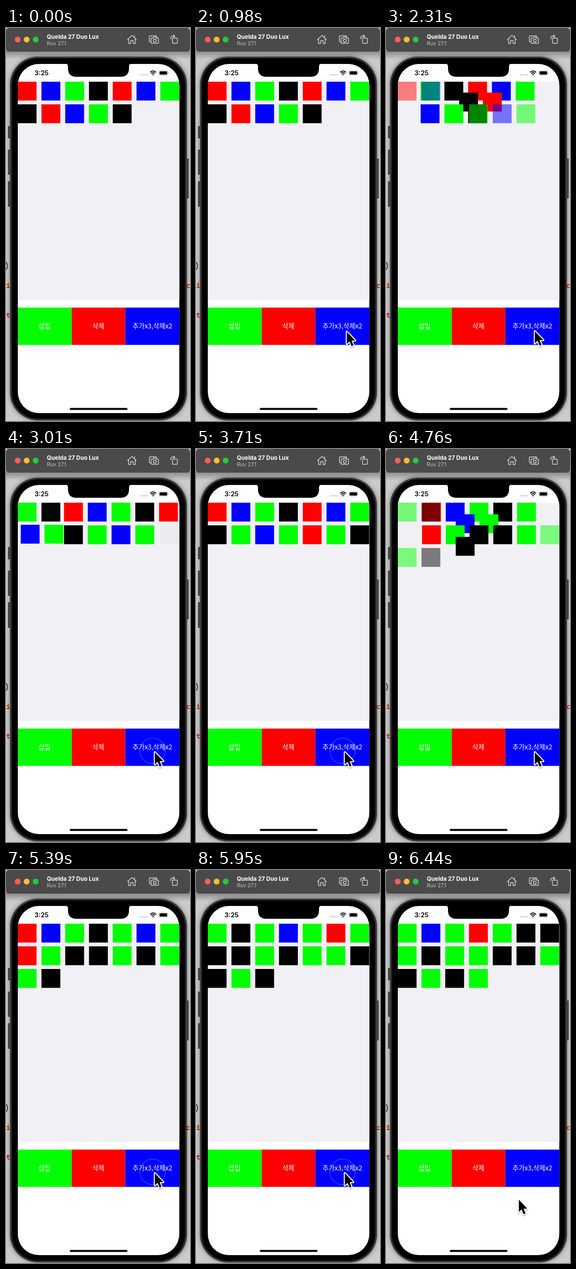
Recreate the animation shown at these times as an HTML page. Size 374 by 798 pixels, loop 6510 ms.

```html
<!DOCTYPE html>
<html lang="ko">
<head>
<meta charset="utf-8">
<title>Grid insert and delete</title>
<style>
  html, body { margin: 0; width: 100%; height: 100%; overflow: hidden; background: #c4c4c4; }
  svg { display: block; width: 374px; height: 798px; }
  .ui { font-family: Inter, Roboto, sans-serif; }
  .code { font: 700 15px "Noto Sans Mono", "DejaVu Sans Mono", monospace; fill: #b3251f; }
  .label { font: 400 13.3px "Noto Sans CJK KR", "Noto Sans CJK", "Noto Sans CJK JP", sans-serif; fill: #fff; text-anchor: middle; }
  .icon { fill: none; stroke: #d6d6d6; stroke-width: 1.4; stroke-linejoin: round; stroke-linecap: round; }
</style>
</head>
<body>
<svg viewBox="0 0 374 798">
  <defs>
    <linearGradient id="barShade" x2="0" y2="1">
      <stop offset="0" stop-opacity=".34"/>
      <stop offset="1" stop-opacity="0"/>
    </linearGradient>
    <filter id="soft" x="-30%" y="-30%" width="160%" height="160%">
      <feDropShadow dx="0" dy="1.5" stdDeviation="1.2" flood-opacity=".4"/>
    </filter>
    <filter id="glow" x="-10%" y="-10%" width="120%" height="120%">
      <feGaussianBlur stdDeviation="5"/>
    </filter>
    <clipPath id="screen"><rect x="24" y="73" width="328.300" height="709" rx="43"/></clipPath>
  </defs>

  <rect width="374" height="798" fill="#cbcbcb"/>
  <path d="M0 514h9v18H0zM366 514h8v18h-8z" fill="#ccd5bd"/>
  <rect x="8" y="58" width="360" height="739" rx="56" opacity=".4" filter="url(#glow)"/>
  <text class="code" x="-3.500" y="488" style="fill:#222;font-size:18px;font-weight:400">)</text>
  <text class="code" x="0" y="528">i</text>
  <text class="code" x="0" y="588">t</text>
  <text class="code" x="366" y="528">c</text>
  <rect y="46" width="374" height="18" fill="url(#barShade)"/>

  <rect width="374" height="48" rx="6" fill="#4a4a4a"/>
  <circle cx="23.800" cy="23.500" r="5.900" fill="#fe5f58"/>
  <circle cx="42" cy="23.500" r="5.900" fill="#febc2e"/>
  <circle cx="60.300" cy="23.500" r="5.900" fill="#28c840"/>
  <g class="ui">
    <text x="83" y="22" font-size="11.6" font-weight="700" fill="#fff">Quelda 27 Duo Lux</text>
    <text x="83" y="35" font-size="10.6" fill="#c4c4c4">Ruv 27.1</text>
  </g>
  <g class="icon" transform="translate(-.6 0)">
    <path d="M247.500 23.500 256.500 15l9 8.500M249.800 22v9.500h4.200v-6h5v6h4.200V22M262 18.500v-3"/>
    <path d="M295 28h-1.500q-1.500 0-1.500-1.500v-9q0-1.500 1.500-1.500h12q1.500 0 1.500 1.500v1"/>
    <path d="M296.500 20.500h3l1.500-2h4l1.500 2h3q1 0 1 1v8.500q0 1-1 1h-13q-1 0-1-1v-8.500q0-1 1-1z"/>
    <circle cx="303" cy="25.500" r="3"/>
    <rect x="339" y="20.500" width="10" height="10.500" rx="1.500"/>
    <path d="M335.500 22v-2q0-3.500 3.500-3.500h4.500M341 14l2.800 2.500-2.800 2.500"/>
  </g>

  <path d="M4 199h6v25H4zM4 247h6v51H4zM4 311h6v52H4zM366 265h5.500v81H366z" fill="#444"/>
  <rect x="8" y="58" width="360" height="739" rx="57" fill="#383838"/>
  <rect x="9.500" y="59.500" width="357" height="736" rx="55.500" fill="#222" stroke="#555" stroke-width=".8"/>
  <rect x="12.500" y="62" width="351" height="731" rx="53" fill="#000"/>

  <g clip-path="url(#screen)">
    <rect x="23" y="72" width="330" height="711" fill="#fff"/>
    <rect x="23" y="109" width="330" height="443" fill="#f1f0f5"/>
    <g id="grid"></g>
    <rect x="23" y="567.700" width="110.500" height="75.800" fill="#0f0"/>
    <rect x="133.500" y="567.700" width="109" height="75.800" fill="#f00"/>
    <rect x="242.500" y="567.700" width="110.500" height="75.800" fill="#00f"/>
    <circle id="ring" cx="298" cy="613" r="26" fill="none" stroke="#1c4dff" stroke-width="2"/>
    <text class="label" x="78.300" y="610">삽입</text>
    <text class="label" x="187.800" y="610">삭제</text>
    <text class="label" x="297.500" y="610">추가x3,삭제x2</text>
    <rect x="129.500" y="771.500" width="117.500" height="4" rx="2"/>
    <path d="M121 72q5 1 5 6v4q0 17 17 17h90q17 0 17-17v-4q0-5 5-6z"/>
    <text class="ui" x="58" y="96.300" font-size="13" font-weight="600">3:25</text>
    <g fill="#c3c3c3">
      <circle cx="274" cy="95" r="1.500"/><circle cx="278.300" cy="95" r="1.500"/>
      <circle cx="282.600" cy="95" r="1.500"/><circle cx="286.900" cy="95" r="1.500"/>
    </g>
    <path d="M293 90q6-5.500 12 0M295.200 92.500q3.800-3.500 7.600 0" fill="none" stroke="#000" stroke-width="1.900"/>
    <path d="M297 94.300q2-1.700 4 0l-2 2.200z"/>
    <rect x="310.800" y="86.700" width="18" height="9.200" rx="2.700" fill="none" stroke="#999" stroke-width=".8"/>
    <rect x="312.200" y="88.100" width="15.200" height="6.400" rx="1.500"/>
    <path d="M330 89.700q1.700 1.600 0 3.200z" fill="#999"/>
  </g>

  <path id="cursor" d="M0 0V25L5.500 19.800 9.700 29.500 13.700 27.800 9.700 18.200H17.200z" fill="#000"
        stroke="#fff" stroke-width="4" paint-order="stroke" stroke-linejoin="round" filter="url(#soft)"/>
</svg>

<script>
const LOOP = 6510, STEP = 70, MOVE = 300;
const taps = [2157, 2976, 3795, 4612, 5430, 6000];
const startCount = 12, added = 3, removed = 2, columns = 7;
const queue = "RBGKRBGKRBGK" + "GBG" + "RGK" + "KGK" + "GGK" + "KGK" + "GKG";
const colors = { R: "#f00", G: "#0f0", B: "#00f", K: "#000" };
const cursorPath = [[560, 385, 720], [910, 306.5, 616.5], [1400, 306.5, 616.5], [1900, 302.5, 615.5], [6220, 302.5, 615.5], [6440, 270, 669.5]];

const byId = id => document.getElementById(id);
const grid = byId("grid"), ring = byId("ring"), cursor = byId("cursor");
const mix = (a, b, p) => a + (b - a) * p;
const clamp = v => Math.min(1, Math.max(0, v));

// Ease-in-out: cubic Bezier (.42, 0, .58, 1), solved by bisection.
function ease(x) {
  if (x <= 0 || x >= 1) return clamp(x);
  let low = 0, high = 1;
  for (let i = 0; i < 24; i++) {
    const s = (low + high) / 2, r = 1 - s;
    if (1.26 * s * r * r + 1.74 * s * s * r + s ** 3 < x) low = s; else high = s;
  }
  return low * low * (3 - 2 * low);
}

const slot = i => ({ x: 23.8 + (i % columns) * 48.3, y: 109 + Math.floor(i / columns) * 46 });

function square(color, { x, y }, opacity = 1) {
  return `<rect x="${x}" y="${y}" width="38.3" height="38.3" fill="${colors[color]}" opacity="${opacity}"/>`;
}

function drawGrid(t) {
  const done = taps.filter(tap => t >= tap).length;
  const before = Math.max(0, done - 1);
  const p = done ? ease((t - taps[before]) / MOVE) : 1;
  const firstOld = removed * before, firstNew = removed * done;
  const endOld = startCount + added * before, endNew = startCount + added * done;
  let moving = "", fading = "";
  for (let i = firstOld; i < endNew; i++) {
    if (i < firstNew) fading += square(queue[i], slot(i - firstOld), 1 - p);
    else if (i >= endOld) fading += square(queue[i], slot(i - firstNew), p);
    else {
      const a = slot(i - firstOld), b = slot(i - firstNew);
      moving += square(queue[i], { x: mix(a.x, b.x, p), y: mix(a.y, b.y, p) });
    }
  }
  grid.innerHTML = moving + fading;
}

function drawCursor(t) {
  const next = cursorPath.findIndex(key => key[0] > t);
  const b = cursorPath.at(next), a = next > 0 ? cursorPath[next - 1] : b;
  const p = a === b ? 0 : ease((t - a[0]) / (b[0] - a[0]));
  cursor.setAttribute("transform", `translate(${mix(a[1], b[1], p)} ${mix(a[2], b[2], p)})`);
  cursor.style.display = t < cursorPath[0][0] ? "none" : "";
}

// The touch ring shows just before each tap and fades soon after.
function drawRing(t) {
  const strength = tap => t < tap - 90 ? 0 : clamp(1 - (t - tap - 40) / 80);
  ring.setAttribute("opacity", 0.8 * Math.max(...taps.map(strength)));
}

function render(now) {
  const t = Math.floor((now % LOOP) / STEP) * STEP;
  drawGrid(t);
  drawCursor(t);
  drawRing(t);
}

const start = performance.now();
function frame() {
  render(performance.now() - start);
  requestAnimationFrame(frame);
}
frame();
</script>
</body>
</html>
```
